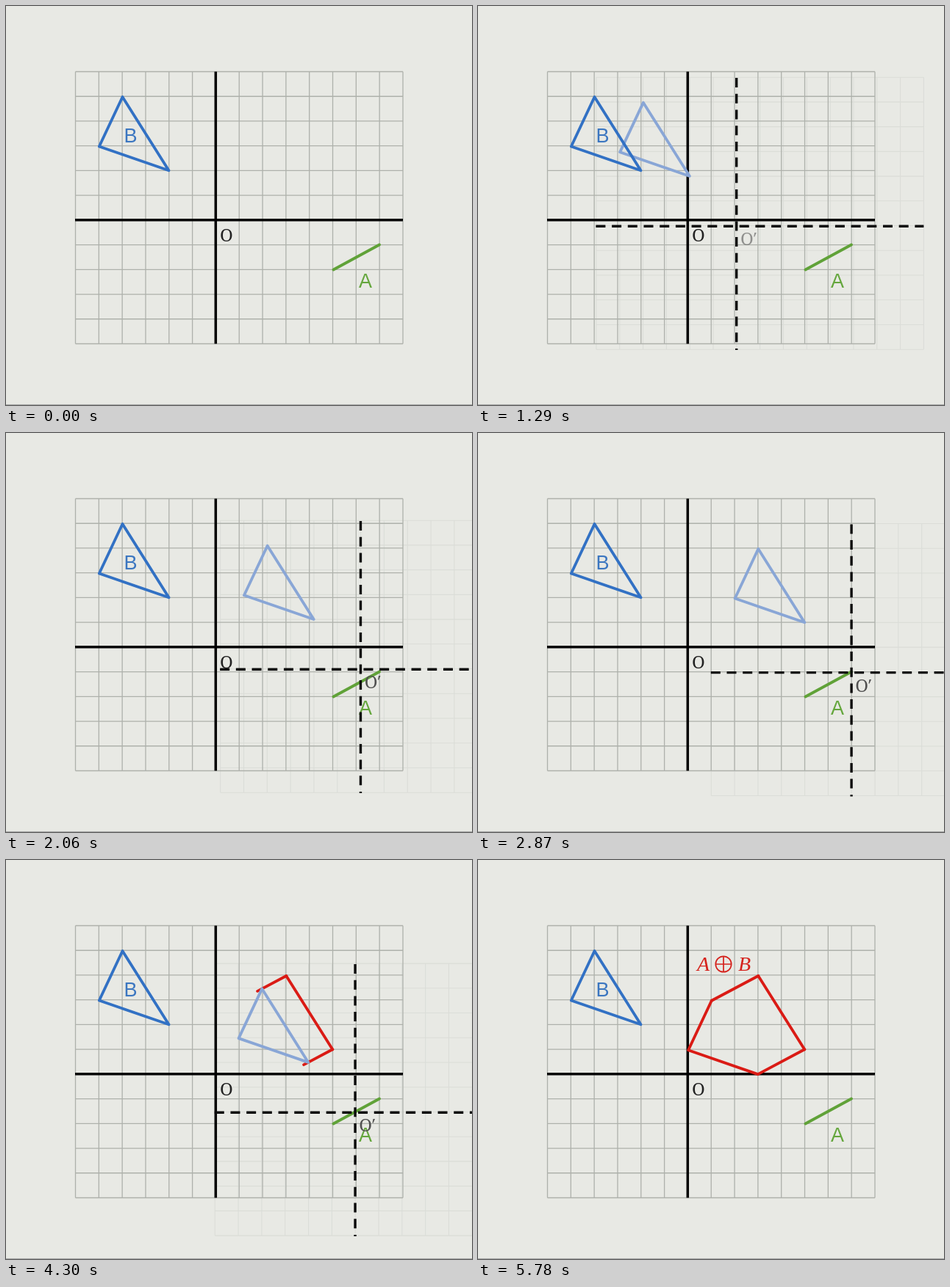
Recreate the animation shown at these times as an HTML page. Size 634 by 544 pixels, loop 5850 ms.

```html
<!DOCTYPE html>
<html lang="en">
<head>
<meta charset="utf-8">
<title>Minkowski sum</title>
<style>
  html, body { margin: 0; width: 634px; height: 544px; overflow: hidden; background: #e8e9e4; }
  svg { display: block; }
  path, line, circle { fill: none; stroke-linejoin: round; }
  .sans { font: 27px "Liberation Sans", sans-serif; }
  .serif { font: 24px "Noto Serif", serif; }
  .math { font: italic 28px "Liberation Serif", serif; fill: #d5221c; }
  .shape { stroke-width: 3.8; stroke-linecap: round; }
  .red { stroke: #da1b15; }
</style>
</head>
<body>
<svg width="634" height="544" viewBox="0 0 634 544">
  <g id="movingGrid"><path class="grid" stroke="#dbddd8" stroke-width="1.1"/></g>
  <path class="grid" stroke="#aeb1ab" stroke-width="1.3"/>
  <path class="axes" stroke="#000" stroke-width="3.5"/>
  <line x1="0" y1="543.5" x2="634" y2="543.5" stroke="#a9aaa8"/>
  <text class="serif" x="291" y="320.5" fill="#222">O</text>

  <path class="shape" stroke="#60a238" d="M445.5 359.5L508 325.5"/>
  <text class="sans" x="480" y="384" fill="#64a63c">A</text>

  <path id="firstEdge" class="shape red"/>
  <path id="sweep" class="shape red"/>
  <path id="lastSides" class="shape red" pathLength="1"/>
  <g id="moving">
    <path class="tri shape" stroke="#89a6d6"/>
    <path class="axes" stroke="#0a0a0a" stroke-width="3.4" stroke-dasharray="13 8.7" transform="translate(0 .9)"/>
    <text id="originLabel" class="serif" x="290.5" y="318.5" fill="#505050">O′</text>
  </g>

  <path class="tri shape" stroke="#3271c4"/>
  <text class="sans" x="160.5" y="186" fill="#3b76c0">B</text>

  <g id="sumLabel">
    <text class="math" x="298" y="151">A</text>
    <g stroke="#d5221c" stroke-width="1.7">
      <circle cx="334" cy="142" r="10.7"/>
      <path d="M323.3 142h21.4M334 131.3v21.4"/>
    </g>
    <text class="math" x="354" y="151">B</text>
  </g>
</svg>
<script>
const LOOP = 5850;
const LEFT = 94.5, TOP = 89.5, RIGHT = 540, BOTTOM = 460.5;
const COLS = 14, ROWS = 11;
const CENTER = [285.3, 291.7];
const [wing, apex, tail] = [[126.8, 191.5], [158.5, 124], [221.5, 224.3]];
const START = [0, -3.5], FAR = [222.8, 34], NEAR = [159.3, 67.8];

const el = id => document.getElementById(id);
const clamp = v => Math.max(0, Math.min(1, v));
const ramp = (t, from, to) => clamp((t - from) / (to - from));
const mix = (a, b, k) => a.map((v, i) => v + (b[i] - v) * k);
const add = (a, b) => a.map((v, i) => v + b[i]);
const poly = (...points) => "M" + points.map(p => p.join(" ")).join("L");
const setAll = (selector, d) =>
  document.querySelectorAll(selector).forEach(node => node.setAttribute("d", d));

// Constant speed with short symmetric acceleration and braking.
function glide(t, from, to, ease = 240) {
  const span = to - from, s = Math.max(0, Math.min(span, t - from));
  const speed = 1 / (span - ease);
  if (s < ease) return speed * s * s / (2 * ease);
  if (s > span - ease) return 1 - speed * (span - s) ** 2 / (2 * ease);
  return speed * (s - ease / 2);
}

function gridPath() {
  let d = "";
  for (let i = 0; i <= COLS; i++) d += `M${LEFT + (RIGHT - LEFT) * i / COLS} ${TOP}V${BOTTOM}`;
  for (let i = 0; i <= ROWS; i++) d += `M${LEFT} ${TOP + (BOTTOM - TOP) * i / ROWS}H${RIGHT}`;
  return d;
}

setAll(".grid", gridPath());
setAll(".axes", `M${LEFT - .5} ${CENTER[1]}H${RIGHT}M${CENTER[0]} ${TOP}V${BOTTOM}`);
setAll(".tri", poly(wing, apex, tail) + "Z");
setAll("#firstEdge", poly(add(apex, FAR), add(tail, FAR)));
setAll("#lastSides", poly(add(apex, NEAR), add(wing, NEAR), add(tail, NEAR)));

function draw(t) {
  const out = mix(START, FAR, glide(t, 780, 2332));
  const offset = t < 3000 ? out : mix(FAR, NEAR, glide(t, 3520, 5030));
  const shown = ramp(t, 770, 860) * (1 - ramp(t, 5260, 5460));
  for (const id of ["movingGrid", "moving"]) {
    el(id).setAttribute("transform", `translate(${offset})`);
    el(id).setAttribute("opacity", shown);
  }
  el("originLabel").setAttribute("opacity", ramp(t, 1000, 1500));

  el("firstEdge").setAttribute("opacity", ramp(t, 3280, 3450));
  const swept = mix(FAR, NEAR, glide(t, 3520, 4830));
  setAll("#sweep", [apex, tail].map(p => poly(add(p, FAR), add(p, swept))).join(""));
  el("sweep").setAttribute("opacity", t > 3520 ? 1 : 0);

  const closed = ramp(t, 5060, 5300);
  el("lastSides").setAttribute("opacity", closed > 0 ? 1 : 0);
  el("lastSides").setAttribute("stroke-dasharray", closed < 1 ? `${closed} 2` : "none");
  el("sumLabel").setAttribute("opacity", ramp(t, 5440, 5700));
}

const began = performance.now();
function tick() {
  draw((performance.now() - began) % LOOP);
  requestAnimationFrame(tick);
}
tick();
</script>
</body>
</html>
```
